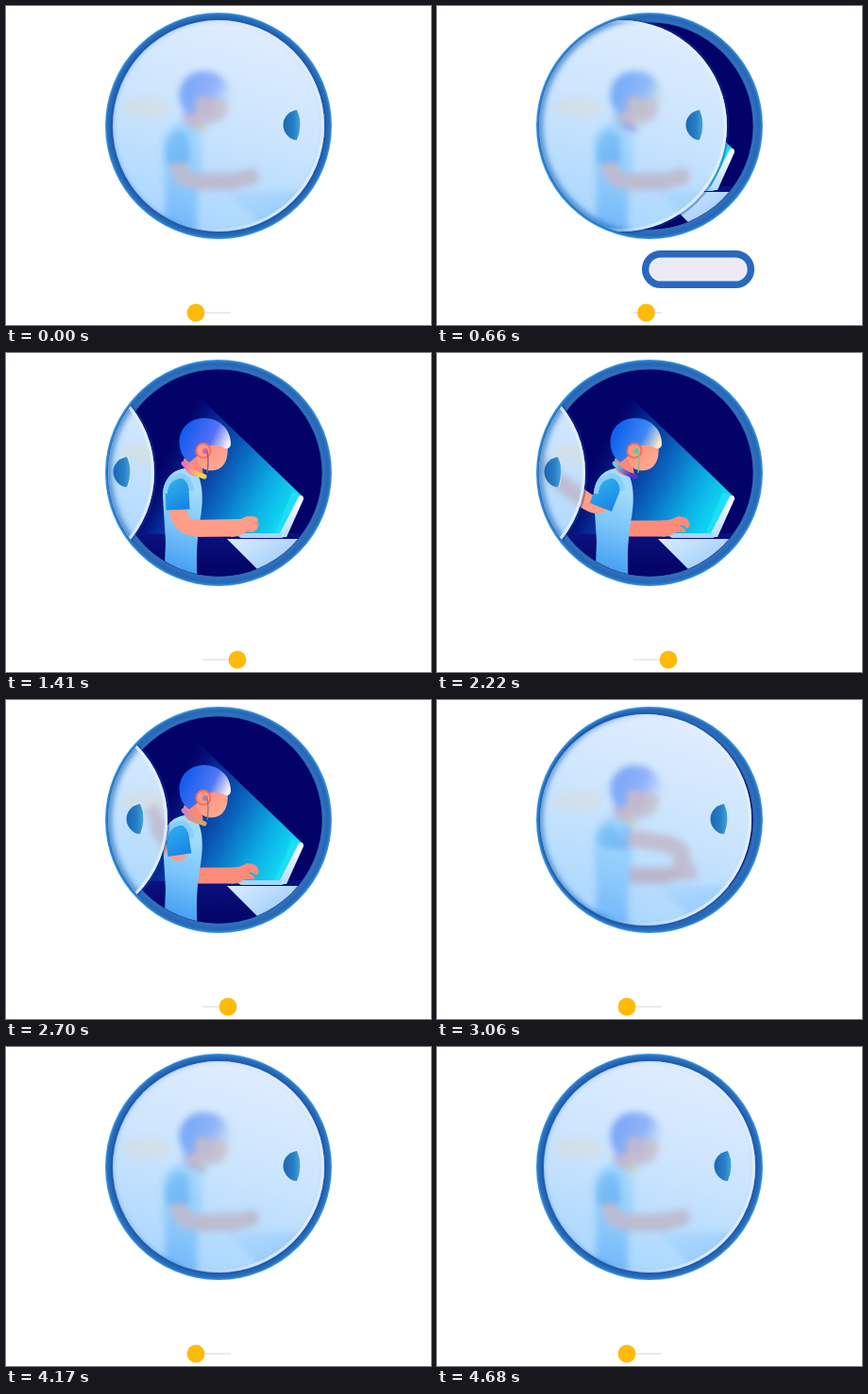
Recreate the animation shown at these times as an HTML page. Size 450 px wide and 338 px high, loop 4.71 s.

```html
<!DOCTYPE html>
<html lang="en">
<head>
<meta charset="utf-8">
<title>Sliding window</title>
<style>
html, body { margin: 0; width: 100%; height: 100%; overflow: hidden; background: #fff; }
svg { display: block; width: 450px; height: 338px; }
</style>
</head>
<body>
<svg viewBox="0 0 450 338">
  <defs>
    <radialGradient id="rim" gradientUnits="userSpaceOnUse" cx="225" cy="127" r="120">
      <stop offset=".9" stop-color="#1d4a9c"/>
      <stop offset=".925" stop-color="#3270ba"/>
      <stop offset=".965" stop-color="#2467b6"/>
      <stop offset=".982" stop-color="#2a73c2"/>
      <stop offset="1" stop-color="#45a3ec"/>
    </radialGradient>
    <linearGradient id="beam" gradientUnits="userSpaceOnUse" x1="302" y1="168" x2="172" y2="98">
      <stop offset="0" stop-color="#12dcf4"/>
      <stop offset=".22" stop-color="#0bb0e6"/>
      <stop offset=".5" stop-color="#0a66be"/>
      <stop offset=".8" stop-color="#08309c" stop-opacity=".8"/>
      <stop offset="1" stop-color="#041078" stop-opacity="0"/>
    </linearGradient>
    <linearGradient id="floor" x1="0" y1="0" x2="0" y2="1">
      <stop offset="0" stop-color="#0a1280"/>
      <stop offset=".6" stop-color="#04066a"/>
    </linearGradient>
    <linearGradient id="table" x1="0" y1="0" x2="1" y2=".7">
      <stop offset="0" stop-color="#dcecff"/>
      <stop offset="1" stop-color="#7fbdf6"/>
    </linearGradient>
    <linearGradient id="lid" x1="0" y1="0" x2="0" y2="1">
      <stop offset="0" stop-color="#fff"/>
      <stop offset="1" stop-color="#b9dcfa"/>
    </linearGradient>
    <linearGradient id="vest" gradientUnits="userSpaceOnUse" x1="205" y1="148" x2="176" y2="238">
      <stop offset="0" stop-color="#a2dcfd"/>
      <stop offset=".4" stop-color="#7cc6fa"/>
      <stop offset="1" stop-color="#3c98f3"/>
    </linearGradient>
    <linearGradient id="sleeve" gradientUnits="userSpaceOnUse" x1="170" y1="130" x2="192" y2="168">
      <stop offset="0" stop-color="#35b4f0"/>
      <stop offset="1" stop-color="#1380e4"/>
    </linearGradient>
    <linearGradient id="skin" x1="0" y1="0" x2="1" y2="1">
      <stop offset="0" stop-color="#f98a78"/>
      <stop offset="1" stop-color="#ffb19a"/>
    </linearGradient>
    <linearGradient id="hair" gradientUnits="userSpaceOnUse" x1="190" y1="84" x2="232" y2="104">
      <stop id="h0" offset="0"/>
      <stop id="h1" offset=".6"/>
      <stop id="h2" offset="1"/>
    </linearGradient>
    <linearGradient id="collar" gradientUnits="userSpaceOnUse" x1="188" y1="117" x2="212" y2="132">
      <stop id="c0" offset=".1"/>
      <stop id="c1" offset=".75"/>
    </linearGradient>
    <linearGradient id="glass" gradientUnits="userSpaceOnUse" x1="260" y1="15" x2="195" y2="239">
      <stop offset="0" stop-color="#e1edfe"/>
      <stop offset=".5" stop-color="#cae4fd"/>
      <stop offset="1" stop-color="#a9d7fe"/>
    </linearGradient>
    <linearGradient id="edge" x1="0" y1="0" x2="1" y2="0">
      <stop offset=".3" stop-color="#e8f1fd" stop-opacity="0"/>
      <stop offset=".75" stop-color="#e8f1fd" stop-opacity=".8"/>
    </linearGradient>
    <linearGradient id="grip" x1="0" y1="0" x2="1" y2="0">
      <stop offset="0" stop-color="#1a66b2"/>
      <stop offset=".6" stop-color="#2780c6"/>
      <stop offset="1" stop-color="#45a4dc"/>
    </linearGradient>
    <filter id="frost" x="-20%" y="-20%" width="140%" height="140%" color-interpolation-filters="sRGB">
      <feGaussianBlur stdDeviation="3.6"/>
      <feColorMatrix values=".75 0 0 0 0  0 .85 0 0 .05  0 0 .85 0 .15  0 0 0 1 0"/>
    </filter>
    <filter id="shade" x="-30%" y="-30%" width="160%" height="160%"><feGaussianBlur stdDeviation="3"/></filter>
    <clipPath id="inner"><circle cx="225" cy="127" r="109.5"/></clipPath>
    <clipPath id="outer"><circle cx="225" cy="127" r="117"/></clipPath>
    <clipPath id="pane"><circle id="paneClip" cx="225" cy="127" r="112"/></clipPath>
  </defs>

  <circle cx="225" cy="127" r="120" fill="url(#rim)"/>

  <g clip-path="url(#inner)">
    <rect x="105" y="7" width="240" height="240" fill="#020268"/>
    <rect x="105" y="191" width="240" height="56" fill="url(#floor)"/>
    <path d="M203 45L314 152L293 196L140 191V110Z" fill="url(#beam)"/>
    <path d="M303 147L311 151L293 196L284 193Z" fill="#22e2f6" opacity=".75"/>
    <path d="M310 152Q315 149 315 155L297 195H288Z" fill="url(#lid)"/>
    <path d="M245 191H292V196H250Q246 196 245 191Z" fill="#a9d4f8"/>
    <g id="figure">
      <path d="M234 197H345V247H284L272 235Z" fill="url(#table)"/>
      <path d="M196 186H242" stroke="#fc8c79" stroke-width="17"/>
      <path id="hand" transform="translate(246 186)" d="M-8 -8.500Q2 -8.500 9 -13Q19 -13 21 -7Q23 -2 19 0Q15 -5 11 -3Q19 1 17 4Q9 3 5 5Q0 9 -8 8.500Z" fill="#fc8c79"/>
      <path d="M190 122C174 124 166 136 166 152L169 200L167 247H203C201 218 202 200 205 180C209 160 209 140 203 129Z" fill="url(#vest)"/>
      <path d="M188 112L206 104L209 131Q196 132 190 124Z" fill="#f98a78"/>
      <path d="M201 96H234.500C236 111 232 124 218 124.500C206 125 199 115 201 96Z" fill="url(#skin)"/>
      <path d="M183.500 95C183.500 79 195 69 210 69C226 69 238 81 238 96Q238 102 232 101Q222 95 215 99L204 108L194 116Q183.500 108 183.500 95Z" fill="url(#hair)"/>
      <circle cx="209" cy="103.500" r="7.500" fill="#ff9b86" stroke="#f2705c" stroke-width="2"/>
      <circle id="bud" cx="211" cy="104" r="3"/>
      <path id="wire" d="M213 104Q215 115 213 127" fill="none" stroke-width="1.300"/>
      <path d="M188 117Q196 127 210 131" fill="none" stroke="url(#collar)" stroke-width="5" stroke-linecap="round"/>
      <g id="arm">
        <path id="limb" fill="none" stroke="#ff9d88" stroke-width="18"/>
        <g id="palm"><path d="M-8 -9Q2 -8.500 8 -12Q19 -14 21 -9Q22 -6 14 -6Q23 -3 20 1Q17 5 10 1Q6 8 -8 9Z" fill="#ff9d88"/></g>
        <path id="cuff" fill="none" stroke="url(#sleeve)" stroke-width="25"/>
        <circle cx="181" cy="144" r="12.500" fill="url(#sleeve)"/>
      </g>
      <path d="M168.500 149Q169 132 186 130Q195 132 197 146" fill="none" stroke="#8bcdfb" stroke-width="5"/>
    </g>
  </g>

  <g clip-path="url(#outer)">
    <circle id="edgeShade" cy="127" r="113" fill="none" stroke="#12459a" stroke-width="3" opacity=".4"/>
    <g clip-path="url(#pane)">
      <circle cx="225" cy="127" r="120" fill="url(#glass)"/>
      <ellipse cx="148" cy="107" rx="26" ry="11" fill="#e4d8c0" opacity=".3" filter="url(#shade)"/>
      <use href="#figure" filter="url(#frost)" opacity=".44"/>
      <circle cx="225" cy="127" r="117" fill="none" stroke="#2a78c4" stroke-width="6" filter="url(#shade)"/>
    </g>
    <g id="door">
      <circle cx="225" cy="127" r="110.500" fill="none" stroke="url(#edge)" stroke-width="3"/>
      <path d="M308 110C298 112 293.500 119 293.500 126C293.500 134 300 142 308 142Q315.500 126 308 110Z" fill="url(#grip)"/>
      <path d="M301 112Q308 107 310 111.500Q314 126 309 142" fill="none" stroke="#d8ebfa" opacity=".7"/>
    </g>
  </g>

  <rect id="pill" y="262.700" height="32.600" rx="16.300" fill="#ecebf5" stroke="#2869be" stroke-width="7.400"/>
  <path d="M208 325H238" stroke="#e5e5e5" stroke-width="1.500"/>
  <circle id="dot" cy="325" r="9.400" fill="#ffba08"/>
</svg>
<script>
const LOOP = 4710;
const $ = id => document.getElementById(id);
const set = (id, attrs) => { for (const k in attrs) $(id).setAttribute(k, attrs[k]); };
const clamp = x => Math.min(1, Math.max(0, x));
const span = (t, a, b) => clamp((t - a) / (b - a));
const cubic = p => p < .5 ? 4 * p ** 3 : 1 - 4 * (1 - p) ** 3;
const lerp = (a, b, p) => a + (b - a) * p;
const mix = (a, b, p) => `rgb(${a.map((v, i) => Math.round(lerp(v, b[i], p)))})`;

// Arm poses: time, elbow x y, hand x y
const POSES = [
  [1620, 183, 186, 246, 185],
  [2060, 172, 167, 124, 132],
  [2530, 172, 167, 124, 132],
  [2800, 190, 168, 176, 134],
  [2900, 214, 152, 245, 138],
  [3060, 256, 153, 260, 172],
  [3180, 252, 156, 258, 180],
  [3600, 183, 186, 246, 185]
];

function armAt(t) {
  const last = POSES.length - 1;
  if (t <= POSES[0][0] || t >= POSES[last][0]) return POSES[0].slice(1);
  const i = POSES.findIndex(p => p[0] > t) - 1;
  const [a, b] = [POSES[i], POSES[i + 1]];
  const p = span(t, a[0], b[0]);
  const q = i > 2 && i < 6 ? p : p * p * (3 - 2 * p);
  return a.slice(1).map((v, k) => lerp(v, b[k + 1], q));
}

function drawArm(t) {
  const [ex, ey, hx, hy] = armAt(t);
  const typing = t < 1620 || t > 3600;
  const tap = typing ? Math.sin(t / LOOP * Math.PI * 28) * .8 : 0;
  const sx = 181, sy = 144;
  const k = Math.min(.85, 22 / Math.hypot(ex - sx, ey - sy));
  const upper = p => `${lerp(sx, ex, p)} ${lerp(sy, ey, p)}`;
  const bend = `${lerp(ex, hx, .35)} ${lerp(ey, hy, .35)}`;
  set('limb', { d: `M${sx} ${sy}L${upper(.5)}Q${ex} ${ey} ${bend}L${hx} ${hy}` });
  set('cuff', { d: `M${sx} ${sy}L${upper(k)}` });
  const deg = Math.atan2(hy - ey, hx - ex) * 180 / Math.PI;
  const flip = hx < ex ? -1 : 1;
  set('palm', { transform: `translate(${hx} ${hy + tap}) rotate(${deg}) scale(1 ${flip})` });
}

function drawColours(t) {
  const k = .5 - .5 * Math.cos((t - 1410) / LOOP * 6 * Math.PI);
  const tint = (id, a, b) => set(id, { 'stop-color': mix(a, b, k) });
  tint('h0', [24, 92, 238], [16, 98, 236]);
  tint('h1', [84, 112, 246], [62, 136, 244]);
  tint('h2', [250, 240, 255], [255, 236, 196]);
  tint('c0', [240, 110, 190], [130, 190, 210]);
  tint('c1', [255, 210, 60], [88, 52, 200]);
  set('bud', { fill: mix([214, 96, 170], [100, 200, 150], k) });
  set('wire', { stroke: mix([130, 92, 150], [130, 190, 130], k) });
}

function drawPill(t) {
  const grow = cubic(span(t, 240, 400));
  const w = t < 560 ? lerp(40, 185, grow) : lerp(185, 40, span(t, 560, 780));
  const inner = w - 7.4;
  set('pill', {
    x: 276.5 - inner / 2,
    width: inner,
    opacity: Math.min(span(t, 240, 320), 1 - span(t, 690, 780))
  });
}

function draw(t) {
  const slide = 180 * (cubic(span(t, 437, 1080)) - cubic(span(t, 2525, 3175)));
  const knob = cubic(span(t, 450, 880)) - cubic(span(t, 2538, 2960));
  set('paneClip', { cx: 225 - slide });
  set('edgeShade', { cx: 225 - slide });
  set('door', { transform: `translate(${-slide} 0)` });
  set('dot', { cx: 201 + 44 * knob });
  drawPill(t);
  drawArm(t);
  drawColours(t);
}

let start;
function tick(now) {
  start ??= now;
  draw((now - start) % LOOP);
  requestAnimationFrame(tick);
}
draw(0);
requestAnimationFrame(tick);
</script>
</body>
</html>
```
